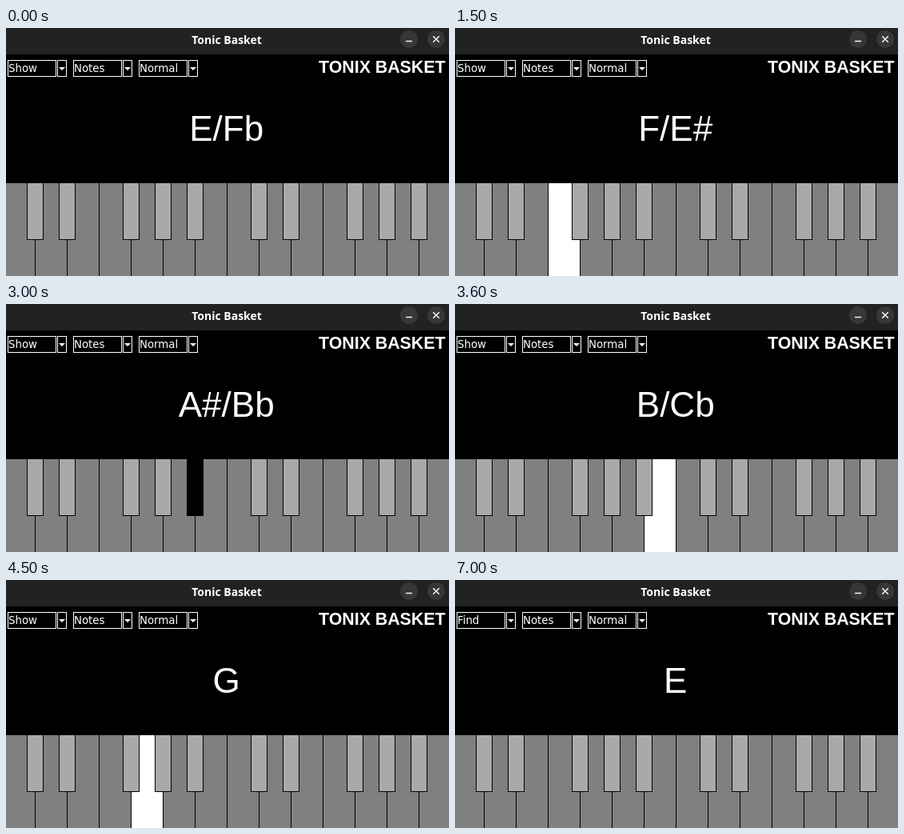
Recreate the animation shown at these times as an HTML page. Size 554 by 310 pixels, loop 8000 ms.

```html
<!DOCTYPE html>
<html lang="en">
<head>
<meta charset="utf-8">
<title>Tonic Basket</title>
<style>
  html, body { margin: 0; height: 100%; overflow: hidden; background: #000; }
  svg { display: block; width: 100vw; height: 100vh; }
  text { fill: #fff; white-space: pre; }
  .title { font: bold 14px "Open Sans", sans-serif; text-anchor: middle; }
  .brand { font: bold 21.33px "Liberation Sans", sans-serif; text-anchor: end; }
  .note { font: 44px "Liberation Sans", sans-serif; text-anchor: middle; }
  .combo text, #menu text { font: 13.33px "DejaVu Sans", sans-serif; }
  .combo rect { fill: #000; stroke: #fff; }
  .combo path { fill: #fff; }
  .button circle { fill: #373737; }
  .button path { fill: none; stroke: #fff; stroke-width: 1.4; }
  .white { fill: #808080; }
  .white.on { fill: #fff; }
  .black { fill: #a9a9a9; stroke: #000; }
  .black.on { fill: #000; }
  #menu { visibility: hidden; animation: menu 8s step-end infinite; }
  #menu text { fill: #000; }
  #pick { animation: pick 8s step-end infinite; }
  @keyframes menu {
    0% { visibility: hidden; }
    68.75% { visibility: visible; }
    87.5%, 100% { visibility: hidden; }
  }
  @keyframes pick {
    0% { transform: none; }
    81.25% { transform: translateY(18px); }
    100% { transform: none; }
  }
</style>
</head>
<body>
<svg viewBox="0 0 554 310" preserveAspectRatio="none">
  <rect width="554" height="310"/>
  <rect width="554" height="33" fill="#222"/>
  <text class="title" x="276" y="20">Tonic Basket</text>
  <g class="button">
    <circle cx="504" cy="14" r="11"/>
    <path d="M500 16.5h8"/>
    <circle cx="538" cy="14" r="11"/>
    <path d="M534.2 10.2l7.6 7.6m0-7.6l-7.6 7.6"/>
  </g>
  <text class="brand" x="549.5" y="56">TONIX BASKET</text>
  <g id="combos"></g>
  <text class="note" id="note" x="275.7" y="141">E/Fb</text>
  <g id="keys"></g>
  <g id="menu">
    <rect x="1" y="62" width="76" height="58" fill="#9e9e9e"/>
    <rect x="2" y="63" width="74" height="56" fill="#fff"/>
    <rect id="pick" x="3" y="64" width="72" height="18" fill="#c3c3c3"/>
    <text x="3" y="77">Show</text>
    <text x="3" y="95">Find</text>
    <text x="3" y="113">Identify</text>
  </g>
</svg>
<script>
  const $ = id => document.getElementById(id);

  function add(parent, tag, attrs, text = "") {
    const el = document.createElementNS("http://www.w3.org/2000/svg", tag);
    for (const name in attrs) el.setAttribute(name, attrs[name]);
    el.textContent = text;
    return parent.appendChild(el);
  }

  const labels = ["Show", "Notes", "Normal"].map((label, i) => {
    const g = add($("combos"), "g", { class: "combo", transform: `translate(${i * 82})` });
    add(g, "rect", { x: 2.5, y: 40.5, width: 60, height: 20 });
    add(g, "rect", { x: 64.5, y: 40.5, width: 11, height: 20 });
    add(g, "path", { d: "M66 49h8l-4 4z" });
    return add(g, "text", { x: 3, y: 55 }, label);
  });

  // Two octaves of keys, named by note and octave
  const keys = {};
  for (let i = 0; i < 14; i++) {
    const x = i * 40 - 4;
    const name = "CDEFGAB"[i % 7] + Math.floor(i / 7);
    keys[name] = add($("keys"), "rect", { class: "white", x: x + 1, y: 194, width: 39, height: 116 });
  }
  for (let i = 0; i < 14; i++) {
    if (i % 7 === 2 || i % 7 === 6) continue;
    const name = "CDEFGAB"[i % 7] + "#" + Math.floor(i / 7);
    keys[name] = add($("keys"), "rect", { class: "black", x: i * 40 + 26.5, y: 193.5, width: 20, height: 71 });
  }

  // start, text, pressed key, release time
  const score = [
    [0, "E/Fb"],
    [1000, "G", "G0", 1200],
    [1500, "F/E#", "F0", 1700],
    [1900, "G", "G0", 2300],
    [3000, "A#/Bb", "A#0", 3400],
    [3600, "B/Cb", "B0", 4000],
    [4200, "A", "A0", 4300],
    [4500, "G", "G0", 4900],
    [7000, "E"]
  ];
  const loop = 8000;
  const moving = document.getAnimations();

  function draw() {
    const t = performance.now() % loop;
    const [, text, key, release] = score.filter(s => s[0] <= t).pop();
    $("note").textContent = text;
    labels[0].textContent = t < 7000 ? "Show" : "Find";
    for (const name in keys) keys[name].classList.toggle("on", name === key && t < release);
    for (const a of moving) a.currentTime = t;
    requestAnimationFrame(draw);
  }
  draw();
</script>
</body>
</html>
```
